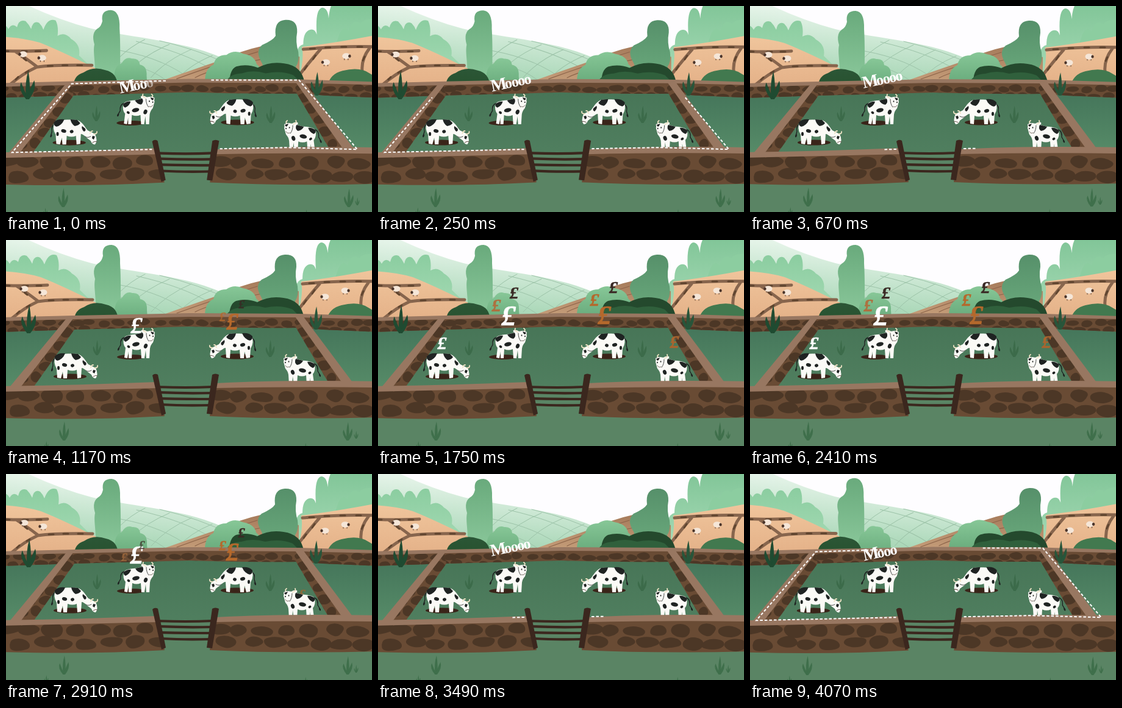
These frames come from a looping animation (600x338 px, 4.16 s). An HTML page:

```html
<!DOCTYPE html>
<html lang="en">
<head>
<meta charset="utf-8">
<title>Cows in the pen</title>
<style>
html, body { margin: 0; width: 100%; height: 100%; overflow: hidden; background: #fefdff; }
svg { display: block; width: 100vw; height: 100vh; }
text { font-family: "Liberation Serif", serif; font-weight: 700; }
</style>
</head>
<body>
<svg id="stage" viewBox="0 0 600 338" preserveAspectRatio="none"></svg>
<script>
const LOOP = 4160, FRAMES = 50;
const stage = document.getElementById('stage');

let seed = 11;
const rnd = () => (seed = (seed * 16807) % 2147483647) / 2147483647;
const clamp = v => Math.max(0, Math.min(1, v));

const fill = (d, color) => `<path d="${d}" fill="${color}"/>`;
const line = (d, color, w) =>
  `<path d="${d}" fill="none" stroke="${color}" stroke-width="${w}" stroke-linecap="round" stroke-linejoin="round"/>`;
const oval = (x, y, rx, ry, color, rot = 0) =>
  `<ellipse cx="${x}" cy="${y}" rx="${rx}" ry="${ry}" fill="${color}" transform="rotate(${rot} ${x} ${y})"/>`;
const grad = (id, from, to, box = 'x1="0" y1="0" x2="0" y2="1"') =>
  `<linearGradient id="${id}" ${box}><stop stop-color="${from}"/><stop offset="1" stop-color="${to}"/></linearGradient>`;

function blob(x, y, rx, ry, color) {
  const n = 7, turn = rnd() * 6, pts = [];
  for (let i = 0; i < n; i++) {
    const a = turn + i * 2 * Math.PI / n, r = 0.95 + rnd() * 0.35;
    pts.push([x + Math.cos(a) * rx * r, y + Math.sin(a) * ry * r]);
  }
  const mid = i => {
    const p = pts[i % n], q = pts[(i + 1) % n];
    return ((p[0] + q[0]) / 2).toFixed(1) + ',' + ((p[1] + q[1]) / 2).toFixed(1);
  };
  let d = 'M' + mid(n - 1);
  for (let i = 0; i < n; i++) d += `Q${pts[i].map(v => v.toFixed(1))} ${mid(i)}`;
  return fill(d + 'Z', color);
}

// A wall face filled with jittered rows of stones
let walls = 0;
function wall(face, [x0, y0, x1, y1], dx, dy) {
  const id = 'w' + walls++;
  let out = `<clipPath id="${id}"><path d="${face}"/></clipPath>${fill(face, '#694b34')}<g clip-path="url(#${id})">`;
  for (let y = y0, row = 0; y <= y1; y += dy, row++)
    for (let x = x0 + (row % 2) * dx / 2; x <= x1; x += dx)
      out += blob(x + (rnd() - .5) * dx * .25, y + (rnd() - .5) * dy * .3,
        dx * (.36 + rnd() * .13), dy * (.38 + rnd() * .12), '#4c3726');
  return out + '</g>';
}

function tuft(x, y, h, color) {
  const blade = (dx, k) => fill(`M${x - h * .05},${y} Q${x + dx - h * .13},${y - h * k * .6} ${x + dx},${y - h * k}
    Q${x + dx + h * .09},${y - h * k * .5} ${x + h * .06},${y}Z`, color);
  return blade(-h * .22, .6) + blade(h * .03, 1) + blade(h * .24, .66);
}

function sheep(x, y, dir) {
  return line(`M${x - 3},${y + 3}v3M${x + 3},${y + 3}v3`, '#4a342a', 1) +
    oval(x, y, 6.5, 4.8, '#f5e6d8') + oval(x + 5.5 * dir, y, 2.2, 2.6, '#4a342a');
}

const INK = '#1f2322', MILK = '#fbfaf6';

const standing = oval(205, 192, 23, 4, '#3a2419') +
  line('M194,160 Q187,162 188,172 L184,179', INK, 1.4) + oval(184.5, 179, 1.3, 2.6, INK, 25) +
  fill('M193,162 C195,155 206,156 216,154 L229,150 C236,149 243,152 244,157 L241,168 Q237,172 236,178 L235,194 L230,194 L229,181 L227,194 L222,194 L221,179 Q214,182 207,179 L206,194 L201,194 L201,183 L199,194 L194,193 L196,177 Q191,171 193,162Z', MILK) +
  fill('M193,161 Q199,156 205,157 Q203,164 196,167 Q192,165 193,161Z', INK) +
  fill('M212,155 L224,152 Q227,158 222,162 Q215,161 212,155Z', INK) +
  oval(213, 171, 6, 3.3, INK, -12) + oval(201, 175, 2.6, 2, INK, 30) +
  oval(229, 174, 3, 4, INK, 20) +
  fill('M228,152 Q220,153 222,148 Q228,147 231,150Z', MILK) +
  line('M229,151 Q223,149 225,145M239,150 Q243,148 239,145', '#efe3c5', 1.8) +
  fill('M230,151 Q237,147 244,151 Q243,161 241,167 Q235,170 232,163Z', MILK) +
  line('M230,153 Q230,161 234,166', INK, .8) +
  fill('M237,150 L243,152 L241,155 L239,154Z', INK) +
  oval(235.5, 156.5, .9, 1.2, INK) + oval(241, 158, .9, 1.2, INK) +
  line('M235,165 Q239,167 241,163', '#5b4a43', .8);

const grazing = oval(379, 191, 27, 4.5, '#3a2419') +
  line('M402,161 Q409,163 407,173 L409,180', INK, 1.4) + oval(408.5, 180, 1.3, 2.6, INK, -20) +
  fill('M403,158 C400,153 376,153 367,154 C358,156 354,165 349,171 L337,177 Q332,188 337,194 Q342,194 344,188 L352,182 Q357,177 360,177 L361,193 L367,194 L368,180 Q375,183 383,180 L384,194 L390,194 L391,183 L394,194 L400,193 L401,178 Q407,168 403,158Z', MILK) +
  fill('M366,154 L377,153 Q376,160 370,164 Q363,163 361,159Z', INK) +
  fill('M387,153 Q399,152 404,158 Q405,163 400,165 Q391,163 387,153Z', INK) +
  oval(375, 173, 3, 2.6, INK, 20) + oval(388, 172, 4.2, 2.8, INK, -15) +
  oval(398, 177, 2, 3.2, INK) +
  fill('M353,168 L358,164 Q360,168 355,173 Q351,172 353,168Z', INK) +
  fill('M343,178 Q351,177 353,181 Q347,186 343,182Z', MILK) +
  line('M344,181 Q350,184 353,181', INK, .8) +
  line('M339,177 Q333,177 334,173M345,176 Q344,172 341,172', '#efe3c5', 1.8) +
  fill('M337,181 L341,180 L342,184 L339,186Z', INK) +
  line('M334,190 Q337,188 341,191', '#6a5750', 1);

const place = (cow, cx, dy) => `<g transform="translate(${cx} ${dy}) scale(-1 1)">${cow}</g>`;

const defs = '<defs>' +
  grad('far', '#f4fbf5', '#9dd1ad', 'x1="0.5" y1="0" x2="0.25" y2="1"') +
  grad('bushL', '#8bcda0', '#a9dcb7') + grad('bushR', '#7fc496', '#a4d9b4') +
  grad('tree', '#69aa7c', '#8cc99c') + grad('treeR', '#56906a', '#6aa97c') +
  grad('round', '#87c797', '#6aac7d') + grad('tan', '#f0c59c', '#e4b188') +
  grad('brown', '#a67b5b', '#c8a07c') + grad('dark', '#2b5636', '#28522f') +
  grad('side', '#44755a', '#588d69') + grad('pen', '#477557', '#507f5f') +
  '</defs>';

const TRACK = '#87654d';
const backdrop =
  fill('M-9,-9H609V180H-9Z', '#fefdff') +
  fill('M-9,-9 H18 Q80,22 140,38 C190,50 250,54 312,71 Q370,87 430,130 H-9Z', 'url(#far)') +
  line('M188,74 Q260,87 304,122M214,59 Q290,76 336,104M252,58 Q320,74 366,98M188,94 Q236,102 262,122' +
    'M228,56 Q204,68 188,84M268,64 Q230,80 206,104M304,72 Q262,90 238,118M338,82 Q300,98 282,120', '#9cc3a8', 1) +
  fill('M-9,130 V34 Q0,28 6,39 Q12,28 20,36 Q23,22 34,26 Q40,32 43,39 Q46,24 56,29 Q61,34 63,40 Q70,20 83,25 Q88,35 86,50 Q98,43 108,55 Q124,64 121,82 L150,110 V130Z', 'url(#bushL)') +
  fill('M470,110 Q472,66 486,64 Q486,43 497,40 Q505,38 508,48 Q505,6 517,4 Q530,5 527,38 Q526,-6 542,-9 H609 V110Z', 'url(#bushR)') +
  fill('M545,47 Q552,32 560,42 Q566,20 579,30 Q587,20 609,24 V90 H530Z', '#8ccda0') +
  fill('M236,130 Q298,108 345,92 Q385,74 418,67 L480,84 V130Z', 'url(#brown)') +
  line('M280,120 Q340,98 412,76M310,118 Q336,104 420,88', '#8b6349', 1.2) +
  fill('M147,130 C149,95 143,78 146,64 Q140,44 153,37 Q157,34 159,26 Q156,8 173,8 Q188,9 187,38 Q189,72 187,130Z', 'url(#tree)') +
  fill('M178,130 Q176,98 190,95 Q197,83 207,87 Q219,86 220,97 Q232,99 231,115 L232,130Z', 'url(#round)') +
  fill('M420,118 Q424,102 417,91 Q408,75 419,65 Q437,57 441,50 Q438,25 457,24 Q477,23 476,44 Q473,60 478,76 Q480,92 474,100 L476,118Z', 'url(#treeR)') +
  fill('M326,124 Q326,103 340,97 Q343,81 361,81 Q374,72 388,79 Q407,82 410,96 Q422,106 417,124Z', 'url(#round)') +
  fill('M-9,51 Q30,53 57,61 Q92,75 148,103 L120,132 H-9Z', 'url(#tan)') +
  line('M-6,74 Q18,76 68,74M18,76 Q34,86 52,100M142,98 Q80,97 52,101 Q30,111 8,130', TRACK, 5) +
  line('M-2,75H6M28,75H36M50,75H58M30,86l5,4M70,99h8M94,98h8M118,98h8M34,110l5,-3M18,121l4,-4', '#60452f', 3) +
  fill('M478,122 Q488,90 484,68 Q536,62 609,48 V130Z', 'url(#tan)') +
  line('M486,72 Q550,66 606,68M514,72 Q500,88 481,112M594,70 Q580,88 582,108', TRACK, 5) +
  line('M497,71h8M522,69h8M548,68h8M574,68h8M506,82l-4,6M492,99l-4,6M586,84l-3,6', '#60452f', 3) +
  sheep(30, 80, -1) + sheep(61, 86, -1) + sheep(523, 93, -1) + sheep(556, 83, 1) +
  fill('M112,132 Q112,115 128,110 Q144,99 164,106 Q183,110 184,132Z', 'url(#dark)') +
  fill('M526,130 Q530,112 550,107 Q578,100 594,111 L609,120 V132Z', '#42794f') +
  fill('M366,126 Q366,105 377,100 Q394,95 412,102 Q432,91 455,95 Q484,99 488,126Z', '#24492d') +
  fill('M360,126 Q365,112 386,111 Q404,105 425,111 Q450,106 470,114 L482,126Z', '#30603c');

const CAP = '#987761';
const ground =
  fill('M-9,140H609V250H-9Z', 'url(#side)') +
  fill('M106,138 H478 L548,245 H38Z', 'url(#pen)') +
  fill('M-9,240H609V347H-9Z', '#5a8464') +
  wall('M-9,130 L110,127 L300,123 L480,124 L609,127 V151 L520,147 L480,144 Q390,145 300,142 L110,147 L-9,151Z', [0, 136, 600, 149], 23, 12) +
  fill('M-9,127 L110,124 Q210,122 300,120 L480,121 L609,125 V130 L480,127 L300,126 L110,130 L-9,133Z', CAP) +
  wall('M108,129 L112,147 L46,240 H12Z', [15, 136, 115, 240], 24, 18) +
  fill('M98,130 L111,128 L25,240 H7Z', CAP) +
  wall('M478,126 L475,143 L532,240 H573Z', [475, 134, 575, 240], 24, 18) +
  fill('M474,126 L487,125 L573,240 H555Z', CAP) +
  tuft(37, 153, 46, '#1f4b31') + tuft(508, 147, 38, '#28553a') +
  tuft(149, 189, 25, '#3c6b4a') + tuft(433, 192, 28, '#3c6b4a');

const front =
  wall('M-9,244 L250,240 L260,289 Q140,296 -9,292Z', [2, 256, 260, 292], 38, 22) +
  fill('M-9,240 Q120,238 246,233 L250,243 Q120,246 -9,249Z', CAP) +
  wall('M342,240 L609,240 V291 Q460,295 334,289Z', [345, 256, 605, 292], 38, 22) +
  fill('M344,235 Q460,229 609,232 V242 Q470,240 342,243Z', CAP) +
  line('M248,241 Q295,243 338,241M250,250 Q290,252 337,251M252,260 Q300,261 336,261M255,270 Q290,272 335,271', '#3b271e', 4.2) +
  fill('M240,222 Q244,218 249,221 L262,285 L255,288Z', '#3b271e') +
  fill('M338,221 Q343,218 349,221 L338,286 L329,285Z', '#3b271e') +
  tuft(95, 329, 31, '#3f6f4b') + tuft(66, 343, 13, '#3f6f4b') +
  tuft(560, 329, 30, '#3f6f4b') + tuft(574, 326, 13, '#3f6f4b') + tuft(491, 344, 11, '#3f6f4b');

// x, centre y, height, colour, first step
const pounds = [
  [214, 124, 32, '#ffffff', 11.4], [371, 123, 30, '#b5692c', 10.6],
  [355, 98, 20, '#b5692c', 12.9], [386, 78, 19, '#3a2a25', 12.8],
  [194, 107, 20, '#ad7140', 14], [223, 87, 19, '#3a2a25', 14],
  [105, 169, 20, '#ffffff', 14], [486, 167, 20, '#a9652f', 14]
];
const letters = [0, 23, 34, 44.5, 55];

// Each dashed half runs from the gate round to the middle of the back wall
const trail = d => `<path class="trail" d="${d}"/>`;
const trails = ['M240,235 L12,240 L109,128 L300,122', 'M350,234 L460,232 L574,235 L479,122 L300,122'];

stage.innerHTML = defs + '<g id="view">' + backdrop + ground +
  pounds.map(([, , h, color]) => `<g class="pound"><text text-anchor="middle" font-style="italic" font-size="${h * 1.48}" y="${h * .49}" fill="${color}" stroke="${color}" stroke-width=".7">£</text></g>`).join('') +
  standing + grazing + place(grazing, 484, 33) + place(standing, 699, 43) + front +
  trails.map((d, i) => `<mask id="m${i}" maskUnits="userSpaceOnUse" x="-20" y="90" width="640" height="180">${trail(d)}</mask>` +
    `<g mask="url(#m${i})"><path d="${d}" fill="none" stroke="#fff" stroke-width="2" stroke-dasharray="4.5 3"/></g>`).join('') +
  '<g id="moo" fill="#fff">' + letters.map((x, i) =>
    `<text class="letter" x="${x}" y="0" font-size="${i ? 24 : 28}">${i ? 'o' : 'M'}</text>`).join('') + '</g></g>';

const all = s => [...stage.querySelectorAll(s)];
const view = stage.querySelector('#view'), moo = stage.querySelector('#moo');
const poundEls = all('.pound'), letterEls = all('.letter');
const trailEls = all('.trail').map(el => {
  el.setAttribute('style', 'fill:none;stroke:#fff;stroke-width:8');
  return { el, len: el.getTotalLength() };
});

function draw(m) {
  const zoom = 1 + .007 * Math.pow(clamp(1 - m / 8), 1.2);
  view.setAttribute('transform', `translate(300 200) scale(${zoom}) translate(-300 -200)`);

  // Eased retreat, already under way when the loop starts
  const left = .5 + .5 * Math.cos(Math.PI * clamp((m + 1.8) / 11.2));
  for (const { el, len } of trailEls) {
    el.style.strokeDasharray = `${len * left} ${len + 9}`;
    el.style.visibility = left > .001 ? 'visible' : 'hidden';
  }

  const rise = m / 8;
  moo.setAttribute('transform', `translate(${188 - 2 * clamp(rise)} ${144 - 9 * rise}) rotate(-12)`);
  moo.setAttribute('opacity', clamp((12 - m) / 3));
  letterEls.forEach((el, i) => el.setAttribute('opacity', clamp((m + 7 - 2 * i) / 2)));

  poundEls.forEach((el, i) => {
    const [x, y, , , start] = pounds[i], u = clamp((m - start) / 7), rest = (1 - u) ** 2;
    el.setAttribute('transform', `translate(${x} ${y + 40 * rest}) scale(${1 - .45 * rest})`);
    el.setAttribute('opacity', clamp(u * 5));
  });
}

// Twelve steps a second, forward then back
function tick() {
  const k = Math.min(FRAMES - 1, Math.floor((performance.now() % LOOP + 10) / (LOOP / FRAMES)));
  draw(Math.min(k, FRAMES - k));
  requestAnimationFrame(tick);
}
tick();
</script>
</body>
</html>
```
